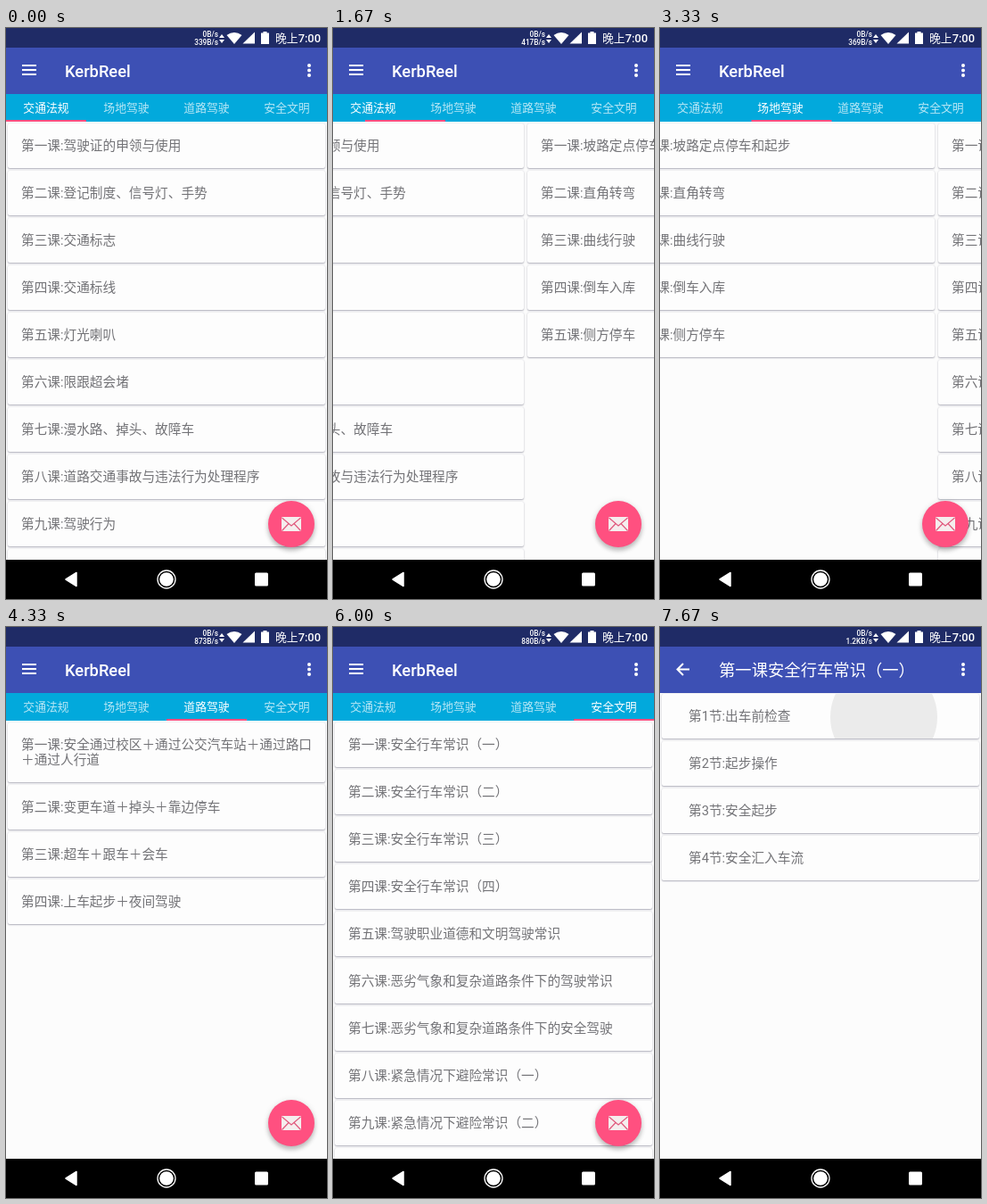
These frames come from a looping animation (360 by 640 pixels, 8 s). An HTML page:

```html
<!DOCTYPE html>
<html lang="zh-CN">
<head>
<meta charset="utf-8">
<title>KerbReel</title>
<style>
html, body { margin: 0; width: 100%; height: 100%; overflow: hidden; background: #000; }
#stage {
  position: relative; width: 360px; height: 640px; overflow: hidden; background: #fcfcfc;
  font-family: Roboto, "Noto Sans CJK SC", "Noto Sans CJK", sans-serif;
}
#stage div, #stage svg { position: absolute; }
.screen { left: 0; top: 22px; width: 360px; height: 574px; overflow: hidden; background: #fcfcfc; }
.bar { left: 0; top: 0; width: 360px; height: 52px; background: #3d50b4; }
.title { left: 66px; top: 0; line-height: 53px; font-size: 18.33px; font-weight: 500; color: #fff; white-space: nowrap; }
.tabs { left: 0; top: 52px; width: 360px; height: 31px; background: #02a9dc; }
.tab { top: 0; width: 90px; line-height: 32.5px; text-align: center; font-size: 12.83px; color: rgba(255,255,255,.72); }
.tab.on { color: #fff; font-weight: 500; }
#mark { left: 0; top: 29px; width: 90px; height: 2px; background: #ff5080; }
.pager { left: 0; top: 83px; width: 360px; height: 491px; overflow: hidden; }
.page { left: 0; top: 0; width: 360px; height: 491px; }
.card {
  left: 2px; width: 356px; border-radius: 2px; overflow: hidden; background: #fdfdfd;
  box-shadow: 0 1px 1.500px rgba(60,60,85,.36), 0 0 2px rgba(90,90,110,.18);
}
.label { top: 16.5px; line-height: 17.2px; font-size: 14.67px; color: #737377; white-space: nowrap; }
.fab {
  left: 294px; top: 508px; width: 52px; height: 52px; border-radius: 50%; background: #ff5080;
  box-shadow: 0 4px 5px rgba(0,0,0,.2), 0 1px 7px rgba(0,0,0,.12);
}
#ripple { left: 189px; top: -34px; width: 120px; height: 120px; border-radius: 50%; background: #ebebeb; }
.status { left: 0; top: 0; width: 360px; height: 22px; background: #1f2b66; color: #fff; }
.rate { right: 122px; line-height: 9px; font-size: 8.25px; font-weight: 500; white-space: nowrap; }
.clock { left: 302px; top: 0; line-height: 23px; font-size: 12.83px; font-weight: 500; white-space: nowrap; }
.nav { left: 0; top: 596px; width: 360px; height: 44px; background: #000; }
</style>
</head>
<body>
<div id="stage">
  <div class="screen" id="home">
    <div class="bar">
      <svg width="360" height="52" fill="#fff">
        <path d="M18 19h16v2h-16zM18 24h16v2h-16zM18 29h16v2h-16z"/>
        <g class="dots"></g>
      </svg>
      <div class="title">KerbReel</div>
    </div>
    <div class="tabs" id="tabs"><div id="mark"></div></div>
    <div class="pager" id="pager"></div>
    <div class="fab">
      <svg width="52" height="52">
        <rect x="15" y="18" width="22" height="16" rx="1" fill="#f5eeee"/>
        <path d="M15.5 19l10.5 9 10.5-9M15.5 33.5l7.5-8M36.5 33.5l-7.5-8" fill="none" stroke="#e0587c" stroke-width="1.2"/>
      </svg>
    </div>
  </div>
  <div class="screen" id="detail">
    <div class="bar">
      <svg width="360" height="52" fill="#fff">
        <path d="M19.5 25.5h13.5M26 19l-6.5 6.5 6.5 6.5" fill="none" stroke="#fff" stroke-width="2"/>
        <g class="dots"></g>
      </svg>
      <div class="title">第一课安全行车常识（一）</div>
    </div>
  </div>
  <div class="status">
    <div class="rate" style="top:3px">0B/s</div>
    <div class="rate" style="top:11.5px" id="rate"></div>
    <svg width="360" height="22" fill="#fff">
      <path d="M239 11l3-4 3 4zM239 13l3 4 3-4z"/>
      <path d="M247.5 8Q256 2 264.5 8L256 18z"/>
      <path d="M279 4.5V17.5H265.5z"/>
      <path d="M288.5 4h4v1.5h2.5v12.5h-9V5.5h2.5z"/>
    </svg>
    <div class="clock">晚上7:00</div>
  </div>
  <div class="nav">
    <svg width="360" height="44" fill="#fff">
      <path d="M67 22l12-7.5v15z" stroke="#fff" stroke-width="1.5" stroke-linejoin="round"/>
      <circle cx="180" cy="22" r="7.8"/>
      <circle cx="180" cy="22" r="10" fill="none" stroke="#fff" stroke-width="1.3"/>
      <rect x="279" y="14.5" width="15" height="15" rx="1.5"/>
    </svg>
  </div>
</div>
<script>
const $ = id => document.getElementById(id);
const NUM = '一二三四五六七八九十';
const TABS = ['交通法规', '场地驾驶', '道路驾驶', '安全文明'];
const LESSONS = [
  ['驾驶证的申领与使用', '登记制度、信号灯、手势', '交通标志', '交通标线', '灯光喇叭', '限跟超会堵',
   '漫水路、掉头、故障车', '道路交通事故与违法行为处理程序', '驾驶行为', '安全驾驶'],
  ['坡路定点停车和起步', '直角转弯', '曲线行驶', '倒车入库', '侧方停车'],
  ['安全通过校区＋通过公交汽车站＋通过路口\n＋通过人行道', '变更车道＋掉头＋靠边停车',
   '超车＋跟车＋会车', '上车起步＋夜间驾驶'],
  ['安全行车常识（一）', '安全行车常识（二）', '安全行车常识（三）', '安全行车常识（四）',
   '驾驶职业道德和文明驾驶常识', '恶劣气象和复杂道路条件下的驾驶常识', '恶劣气象和复杂道路条件下的安全驾驶',
   '紧急情况下避险常识（一）', '紧急情况下避险常识（二）', '紧急情况下避险常识（三）']
];
const SECTIONS = ['出车前检查', '起步操作', '安全起步', '安全汇入车流'];

function add(parent, cls, text = '') {
  const el = document.createElement('div');
  el.className = cls;
  el.textContent = text;
  parent.append(el);
  return el;
}

function addCards(parent, texts, top, left) {
  return texts.map(text => {
    const lines = text.split('\n').length;
    const height = 49.5 + (lines - 1) * 17.2;
    const card = add(parent, 'card');
    card.style.top = top + 'px';
    card.style.height = height + 'px';
    const label = add(card, 'label', text);
    label.style.left = left - 2 + 'px';
    label.style.whiteSpace = 'pre';
    top += height + 3.5;
    return card;
  });
}

function addPage(lessons) {
  const page = add($('pager'), 'page');
  addCards(page, lessons.map((s, i) => `第${NUM[i]}课:${s}`), 2, 17);
  return page;
}

const tabs = TABS.map((name, i) => {
  const tab = add($('tabs'), 'tab', name);
  tab.style.left = i * 90 + 'px';
  return tab;
});
$('tabs').append($('mark'));
const pages = LESSONS.map(addPage);
const stalePage = addPage(LESSONS[0]);   // third tab before its own list loads
const sections = addCards($('detail'), SECTIONS.map((s, i) => `第${i + 1}节:${s}`), 53, 32);
const ripple = document.createElement('div');
ripple.id = 'ripple';
sections[0].prepend(ripple);

document.querySelectorAll('.dots').forEach(g => {
  g.innerHTML = [20, 25.5, 31].map(y => `<circle cx="340" cy="${y}" r="2"/>`).join('');
});

// time, pager position, selected tab, network rate, detail progress
const STEPS = [
  [0, 0, 0, '339B/s', 0],
  [1330, 0, 0, '417B/s', 0],
  [1670, 0.4, 0, '417B/s', 0],
  [2000, 0.94, 1, '417B/s', 0],
  [2330, 1, 1, '417B/s', 0],
  [2670, 1, 1, '369B/s', 0],
  [3330, 1.139, 1, '369B/s', 0],
  [3670, 1.85, 2, '873B/s', 0],
  [4000, 2, 2, '873B/s', 0],
  [4670, 2.12, 2, '873B/s', 0],
  [5000, 2.65, 2, '873B/s', 0],
  [5330, 3, 3, '873B/s', 0],
  [5670, 3, 3, '880B/s', 0],
  [6330, 3, 3, '500B/s', 0.8],
  [6670, 3, 3, '500B/s', 1],
  [7330, 3, 3, '1.2KB/s', 1]
];
const LOOP = 8000, LIST_READY = 3670, TOUCH = 7670;
let shown = '';

function draw(t) {
  const [at, pos, sel, rate, open] = STEPS.filter(s => s[0] <= t).pop();
  const touched = t >= TOUCH;
  const key = at + '|' + touched;
  if (key === shown) return;
  shown = key;

  const place = (page, i) => page.style.transform = `translateX(${Math.round((i - pos) * 360)}px)`;
  pages.forEach(place);
  place(stalePage, 2);
  stalePage.style.display = t < LIST_READY ? '' : 'none';
  pages[2].style.display = t < LIST_READY ? 'none' : '';
  tabs.forEach((tab, i) => tab.classList.toggle('on', i === sel));
  $('mark').style.transform = `translateX(${pos * 90}px)`;
  $('rate').textContent = rate;
  $('detail').style.opacity = open;
  $('detail').style.transform = `translateY(${(1 - open) * 40}px)`;
  ripple.style.display = touched ? '' : 'none';
}

const start = performance.now();
function tick() {
  draw((performance.now() - start) % LOOP);
  requestAnimationFrame(tick);
}
tick();
</script>
</body>
</html>
```
